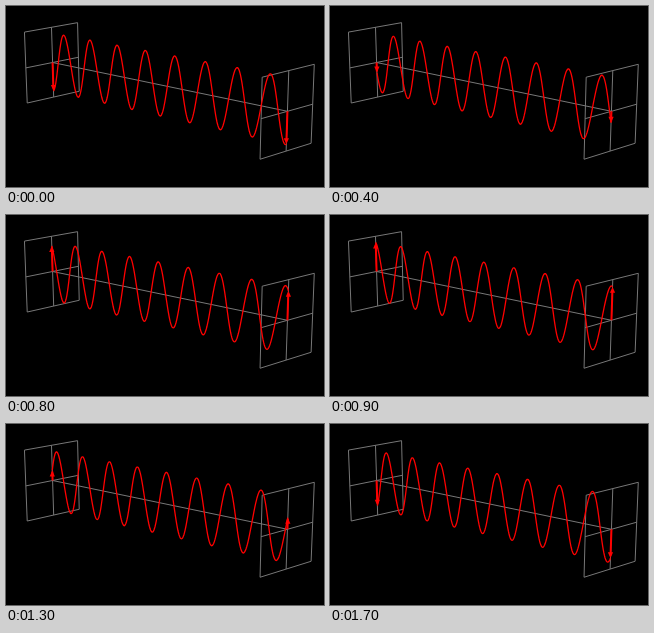
Write an HTML page with a canvas that moves like this. It is 318 px wide and 181 px high and loops after 1.8 s.

```html
<!DOCTYPE html>
<html lang="en">
<head>
<meta charset="utf-8">
<title>Travelling wave</title>
<style>
  html, body { margin: 0; width: 100%; height: 100%; overflow: hidden; background: #000; }
  canvas { display: block; }
</style>
</head>
<body>
<canvas id="stage" width="318" height="181"></canvas>
<script>
const ctx = document.getElementById('stage').getContext('2d');
const LOOP = 1800, STEP = 100, CRESTS = 8, AMP = 0.84;
const GREY = '#777', RED = '#f00';

// x, y: -1..1 across a square; z: 0 at the left square, 1 at the right one
function project(x, y, z) {
  const w = 1 + 0.018 * x - 0.0095 * y - 0.145 * z;
  return [
    (46.1 + 27.1 * x - 1.53 * y + 194.1 * z) / w,
    (56 - 4.3 * x - 35.4 * y + 33.6 * z) / w
  ];
}

function line(points, color, width, closed) {
  ctx.beginPath();
  points.forEach(p => ctx.lineTo(...project(...p)));
  if (closed) ctx.closePath();
  ctx.strokeStyle = color;
  ctx.lineWidth = width;
  ctx.stroke();
}

function square(z) {
  line([[-1, -1, z], [1, -1, z], [1, 1, z], [-1, 1, z]], GREY, 1, true);
  line([[-1, 0, z], [1, 0, z]], GREY, 1);
  line([[0, -1, z], [0, 1, z]], GREY, 1);
}

function arrow(y, z) {
  const [x0, y0] = project(0, 0, z);
  const [x1, y1] = project(0, y, z);
  const dir = Math.sign(y);
  const neck = y1 + dir * 6;
  line([[0, 0, z], [0, y * 0.9, z]], RED, 2);
  ctx.beginPath();
  ctx.moveTo(x1, y1);
  ctx.lineTo(x1 - 2.6, neck);
  ctx.lineTo(x1 + 2.6, neck);
  ctx.fillStyle = RED;
  ctx.fill();
}

function draw(time) {
  const t = Math.floor((time % LOOP) / STEP) * STEP;
  const height = z => AMP * Math.cos(2 * Math.PI * (CRESTS * z - (t - 950) / LOOP));

  ctx.setTransform(1, 0, 0, 1, 0, 0);
  ctx.fillStyle = '#000';
  ctx.fillRect(0, 0, 318, 181);
  ctx.translate(0.5, 0.5);

  square(0);
  square(1);
  line([[0, 0, 0], [0, 0, 1]], GREY, 1);

  const wave = [];
  for (let i = 0; i <= 400; i++) wave.push([0, height(i / 400), i / 400]);
  line(wave, RED, 1.3);

  arrow(height(0), 0);
  arrow(height(1), 1);
}

function tick() {
  draw(performance.now());
  requestAnimationFrame(tick);
}
tick();
</script>
</body>
</html>
```
